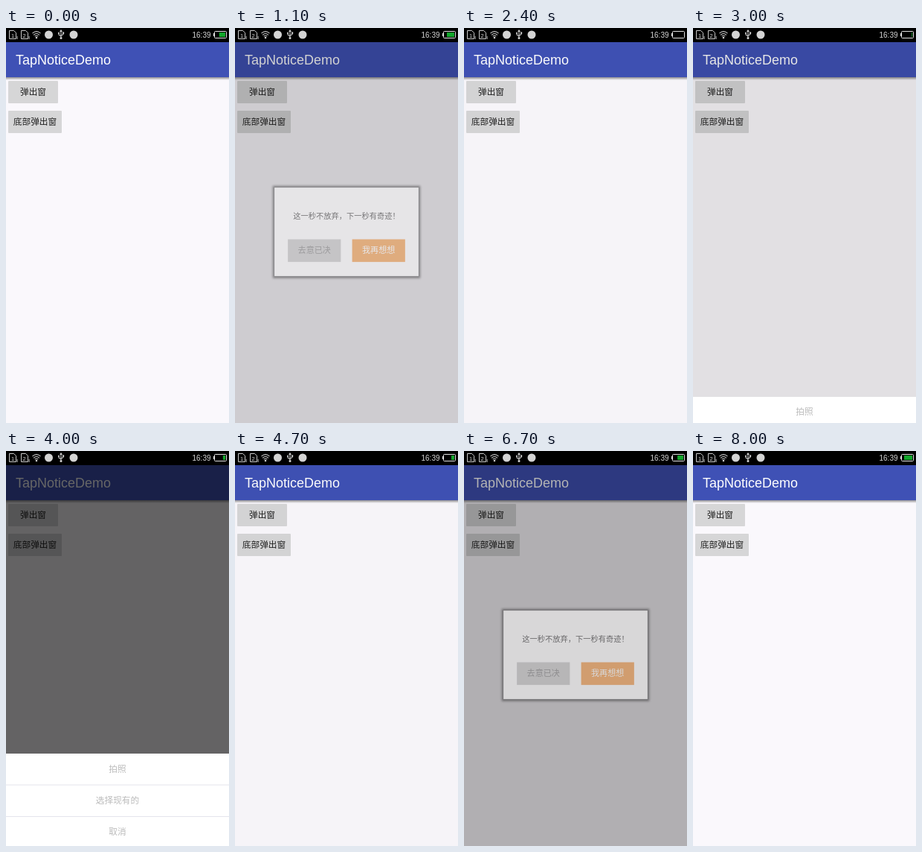
Write an HTML page that moves like this. It is 300x530 px and loops after 8100 ms.

```html
<!DOCTYPE html>
<html lang="zh">
<head>
<meta charset="utf-8">
<style>
html, body { margin: 0; width: 100%; height: 100%; overflow: hidden; background: #faf8fc; }
svg { display: block; width: 300px; height: 530px; }
text { font-family: "Noto Sans CJK SC", "Noto Sans CJK", sans-serif; font-size: 11.7px; text-anchor: middle; }
.latin { font-family: "Liberation Sans", Arial, sans-serif; text-anchor: start; }
</style>
</head>
<body>
<svg viewBox="0 0 300 530" xmlns="http://www.w3.org/2000/svg">
  <defs>
    <linearGradient id="drop" x1="0" y1="0" x2="0" y2="1">
      <stop offset="0" stop-color="#000" stop-opacity=".42"/>
      <stop offset="1" stop-color="#000" stop-opacity="0"/>
    </linearGradient>
    <filter id="soft" x="-10%" y="-10%" width="120%" height="120%"><feGaussianBlur stdDeviation="1.4"/></filter>
    <g id="sim" fill="none" stroke="#c8c8c8">
      <path d="M.5 .5H6.5L9.5 3.5V11.500H.5Z"/>
      <path d="M11.200 8V12" stroke-width=".9"/>
    </g>
  </defs>

  <rect width="300" height="530" fill="#faf8fc"/>
  <rect y="66" width="300" height="4" fill="url(#drop)"/>
  <rect y="19" width="300" height="47" fill="#3f51b5"/>
  <text class="latin" x="13" y="49" style="font-size:18px" fill="#fff">TapNoticeDemo</text>

  <rect id="btnA" x="3" y="71" width="67" height="30" rx="1"/>
  <text x="36.500" y="90" fill="#222">弹出窗</text>
  <rect id="btnB" x="3" y="111" width="72" height="30" rx="1"/>
  <text x="39" y="130" fill="#222">底部弹出窗</text>

  <rect id="dim" y="19" width="300" height="511" fill="#000"/>

  <g id="dialog">
    <rect x="45.500" y="208.500" width="209" height="130.500" fill="#000" opacity=".72" filter="url(#soft)"/>
    <rect x="48" y="211" width="204" height="125" fill="#fff"/>
    <text x="150" y="255.500" style="font-size:10.8px" fill="#222">这一秒不放弃，下一秒有奇迹！</text>
    <rect x="67" y="284" width="75" height="32" fill="#bdbdbd"/>
    <text x="104.500" y="304" fill="#6c6c6c">去意已决</text>
    <rect x="158" y="284" width="75" height="32" fill="#f18d2e"/>
    <text x="195.500" y="304" fill="#fff">我再想想</text>
  </g>

  <g id="sheet" fill="#bbb">
    <rect y="406" width="300" height="126" fill="#fff"/>
    <path d="M0 448H300M0 490.500H300" stroke="#e4e4ec"/>
    <text x="150" y="430.500">拍照</text>
    <text x="150" y="472.500">选择现有的</text>
    <text x="150" y="514.500">取消</text>
  </g>

  <rect width="300" height="19" fill="#000"/>
  <use href="#sim" x="4" y="3"/>
  <use href="#sim" x="20" y="3"/>
  <g fill="#d4d4d4">
    <text class="latin" x="7" y="12.500" style="font-size:7.5px">1</text>
    <text class="latin" x="22.500" y="12.500" style="font-size:7.5px">2</text>
    <circle cx="41" cy="13" r="1.300"/>
    <circle cx="57.500" cy="9" r="5.500"/>
    <circle cx="91" cy="9" r="5.500"/>
    <circle cx="74" cy="13.500" r="1.500"/>
    <path d="M74 2L76 5H72Z"/>
    <circle cx="71" cy="6.800" r="1.100"/>
    <rect x="76" y="5.500" width="2.200" height="2.200"/>
    <text class="latin" x="250.500" y="12.800" style="font-size:10px">16:39</text>
  </g>
  <g fill="none" stroke="#c8c8c8" stroke-width="1.100">
    <path d="M35.500 7.200Q41 2.200 46.500 7.200M37 9.300Q41 5.700 45 9.300M38.700 11.200Q41 9.300 43.300 11.200"/>
    <path d="M74 4V13M71 7V9L74 11M77 7V8.500L74 10.500"/>
  </g>
  <rect x="280.500" y="4.500" width="16" height="9" rx="1" fill="none" stroke="#e2e2e2"/>
  <rect x="279" y="7" width="1.500" height="4" fill="#e2e2e2"/>
  <rect id="charge" y="6" height="6" fill="#12a52c"/>
</svg>
<script>
const LOOP = 8100, STEP = 100;
const el = id => document.getElementById(id);
const set = (id, attrs) => {
  for (const k in attrs) el(id).setAttribute(k, attrs[k]);
};
const clamp = v => Math.max(0, Math.min(1, v));
const ease = p => (1 - Math.cos(Math.PI * p)) / 2;

// Opening and closing progress of a popup
const phase = (t, open, close) => ({
  on: clamp((t - open) / 300),
  off: clamp((t - close) / 200)
});
const shade = p => Math.pow(p.on, 1.75) * Math.pow(1 - p.off, 1.2);
const shown = p => ease(p.on) * (1 - ease(clamp(p.off / 0.9)));
const between = (t, a, b) => t >= a && t < b;
const face = down => ({ fill: down ? "#cacacb" : "#d6d6d7" });

// The charge grows leftward every 400 ms and empties at 2400
function chargeEdge(t) {
  const k = Math.floor(t / 400);
  return k < 6 ? 286.9 - 0.95 * k : 295 - 11 * (k - 6) / 14;
}

function draw(time) {
  const t = Math.floor((time % LOOP) / STEP) * STEP;
  const dialog = t < 4000 ? phase(t, 950, 2210) : phase(t, 5350, 6610);
  const sheet = phase(t, 2893, 4510);

  set("btnA", face(between(t, 800, 1000) || between(t, 5200, 5400)));
  set("btnB", face(between(t, 2800, 2900)));
  set("dim", { opacity: 0.6 * Math.max(shade(dialog), shade(sheet)) });

  const d = shown(dialog), s = 0.9 + 0.1 * d;
  set("dialog", {
    opacity: d,
    transform: `translate(150 273.5) scale(${s}) translate(-150 -273.5)`
  });
  set("sheet", { transform: `translate(0 ${124 * (1 - shown(sheet))})` });

  const x = chargeEdge(t);
  set("charge", { x, width: 295 - x });
}

let start;
function tick(now) {
  if (start === undefined) start = now;
  draw(now - start);
  requestAnimationFrame(tick);
}
draw(0);
requestAnimationFrame(tick);
</script>
</body>
</html>
```
